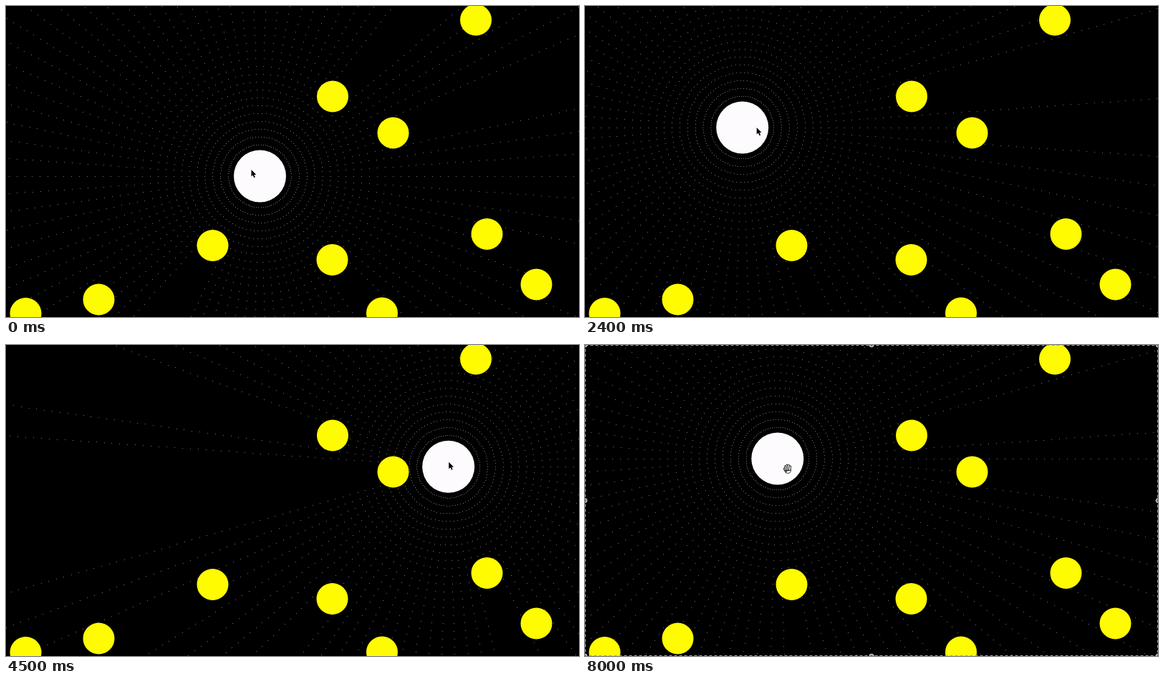
Animation, 800 px wide and 435 px high, one loop 8100 ms. Source, as an HTML page with a canvas:

```html
<!DOCTYPE html>
<html lang="en">
<head>
<meta charset="utf-8">
<title>Light rays</title>
<style>
  html, body { margin: 0; width: 100%; height: 100%; overflow: hidden; background: #000; }
  canvas { display: block; }
</style>
</head>
<body>
<canvas id="stage" width="800" height="435"></canvas>
<script>
const W = 800, H = 435, LOOP = 8100, STEP = 100;
const SUN_R = 36.5, ORB_R = 22, GAP = 10.95, LAG = 0.1;
const OVERLAY_AT = 7.6, OVERLAY_MOVE = 0.4;
const ctx = document.getElementById('stage').getContext('2d');

const orbs = [
  [656, 19.5], [456, 126.5], [540.5, 177.5], [288.5, 335], [455.5, 355],
  [671.5, 319], [740.5, 389.5], [525, 429.5], [129.5, 410.5], [27.5, 430]
];

// Sun path; the lead is how far the pointer runs ahead, which also sets the speed
const key = (t, x, y, leadX = 0, leadY = 0) => ({ t, x, y, leadX, leadY });
const path = [
  key(0, 354.5, 238, -12, -9),
  key(1.1, 247, 110.5),
  key(2.4, 219.7, 170, 20, 0),
  key(3.8, 582.3, 243, 12, -5),
  key(4.65, 618, 165),
  key(5.3, 352.4, 74, -14, 12),
  key(6.1, 236.6, 176.3, 14, -12),
  key(7.1, 268.8, 159)
];

// Cubic Hermite: position and velocity over a span of d seconds
function hermite(a, b, va, vb, u, d) {
  const c1 = va * d, end = vb * d;
  const c2 = 3 * (b - a) - 2 * c1 - end, c3 = 2 * (a - b) + c1 + end;
  return {
    pos: a + u * (c1 + u * (c2 + u * c3)),
    vel: (c1 + u * (2 * c2 + u * 3 * c3)) / d
  };
}

function pose(t) {
  const i = Math.max(1, path.findIndex(k => k.t > t));
  const inPath = t < path[path.length - 1].t;
  const b = inPath ? path[i] : path[path.length - 1];
  const a = inPath ? path[i - 1] : path[path.length - 2];
  const d = b.t - a.t, u = Math.min(1, (t - a.t) / d);
  const x = hermite(a.x, b.x, a.leadX / LAG, b.leadX / LAG, u, d);
  const y = hermite(a.y, b.y, a.leadY / LAG, b.leadY / LAG, u, d);
  return { x: x.pos, y: y.pos, px: x.pos + x.vel * LAG, py: y.pos + y.vel * LAG };
}

function disc(x, y, r, color) {
  ctx.fillStyle = color;
  ctx.beginPath();
  ctx.arc(x, y, r, 0, Math.PI * 2);
  ctx.fill();
}

// Dots march outwards along each ray until they hit an orb or leave the stage
function rays(cx, cy) {
  ctx.fillStyle = '#747474';
  for (let deg = 0; deg < 360; deg += 4) {
    const dx = Math.cos(deg * Math.PI / 180), dy = Math.sin(deg * Math.PI / 180);
    for (let r = GAP * 4; ; r += GAP) {
      const x = cx + dx * r, y = cy + dy * r;
      if (x < 0 || x > W || y < 0 || y > H) break;
      if (orbs.some(o => Math.hypot(o[0] - x, o[1] - y) < GAP)) break;
      ctx.fillRect(Math.floor(x), Math.floor(y), 1, 1);
    }
  }
}

function arrow(x, y) {
  const shape = new Path2D('M0 0V9.6L2.2 7.6L3.8 11.2L5.4 10.5L3.9 7H6.8Z');
  ctx.save();
  ctx.translate(x, y);
  ctx.strokeStyle = '#fff';
  ctx.lineWidth = 1.4;
  ctx.lineJoin = 'round';
  ctx.stroke(shape);
  ctx.fillStyle = '#000';
  ctx.fill(shape);
  ctx.restore();
}

function finger(x1, y1, x2, y2) {
  for (const [color, width] of [['#000', 3.2], ['#fff', 1.6]]) {
    ctx.strokeStyle = color;
    ctx.lineWidth = width;
    ctx.beginPath();
    ctx.moveTo(x1, y1);
    ctx.lineTo(x2, y2);
    ctx.stroke();
  }
}

function hand(x, y) {
  ctx.save();
  ctx.translate(x, y);
  ctx.lineCap = 'round';
  disc(0.3, 2.2, 4.6, '#000');
  disc(0.3, 2.2, 3.8, '#fff');
  finger(-2, 3, -4.4, 0.4);
  for (let i = 0; i < 4; i++) {
    const side = i - 1.5;
    finger(side * 1.7 + 0.3, 1.5, side * 2.3 + 0.2, side * side * 0.8 - 4.7);
  }
  ctx.restore();
}

function selection() {
  ctx.strokeStyle = '#a0a0a0';
  ctx.lineWidth = 1;
  ctx.setLineDash([4, 3]);
  ctx.strokeRect(0.5, 0.5, W - 1, H - 1);
  ctx.setLineDash([]);
  for (const x of [0, W / 2, W])
    for (const y of [0, H / 2, H])
      if (x !== W / 2 || y !== H / 2) {
        disc(x, y, 3.2, '#d8d8d8');
        disc(x, y, 2.2, '#777');
      }
}

function draw(t) {
  const p = pose(t);
  ctx.fillStyle = '#000';
  ctx.fillRect(0, 0, W, H);
  rays(p.x, p.y);
  for (const [x, y] of orbs) disc(x, y, ORB_R, '#fffb00');
  disc(p.x, p.y, SUN_R, '#fdfbfe');
  if (t < OVERLAY_AT) {
    arrow(p.px, p.py);
  } else {
    const u = Math.min(1, (t - OVERLAY_AT) / OVERLAY_MOVE);
    hand(p.px + 14 * u, p.py + 14 * u);
    selection();
  }
}

const start = performance.now();
let last = -1;
function tick() {
  const n = Math.floor(((performance.now() - start) % LOOP) / STEP);
  if (n !== last) draw(n * STEP / 1000);
  last = n;
  requestAnimationFrame(tick);
}
tick();
</script>
</body>
</html>
```
